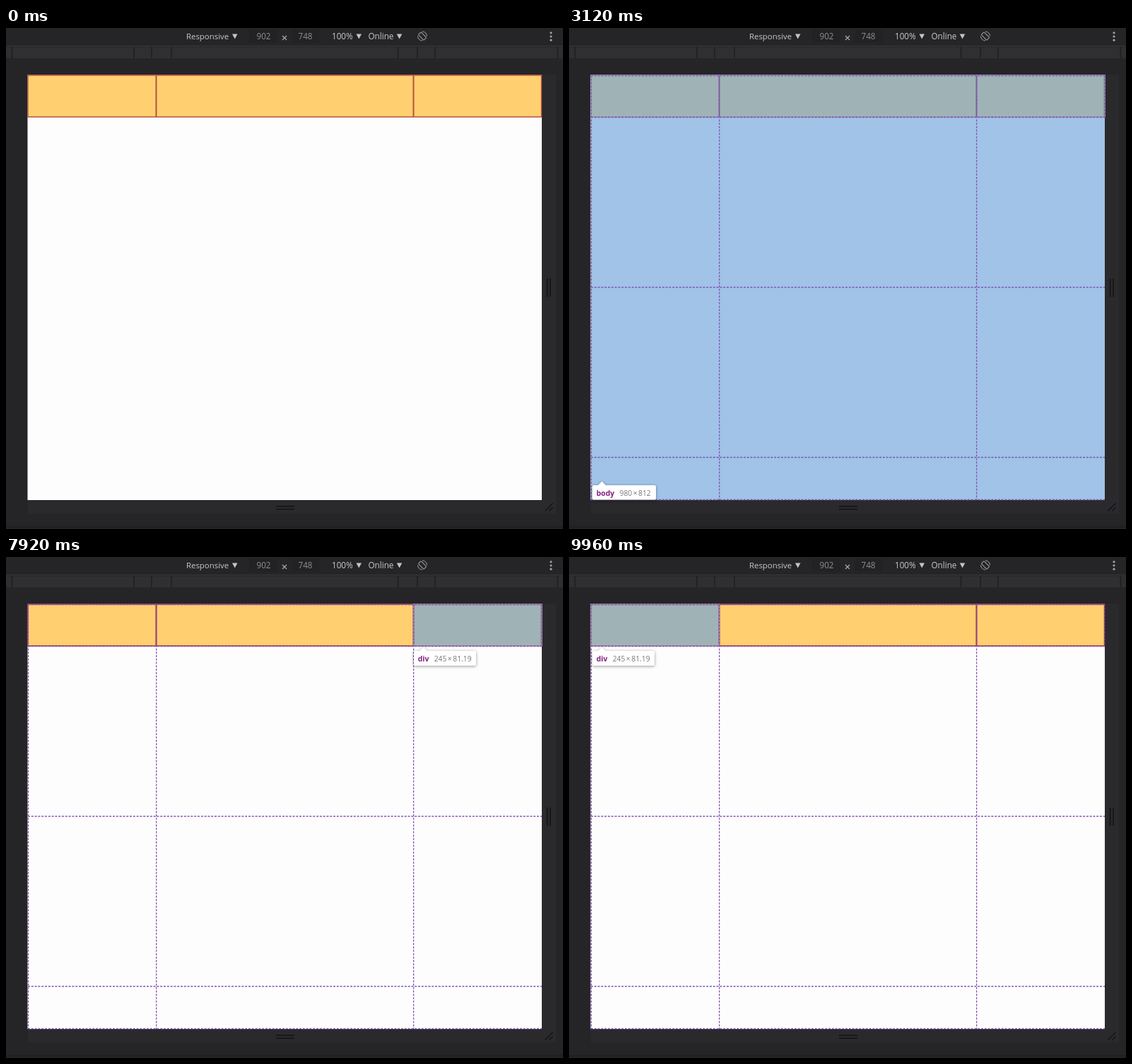
These frames come from a looping animation (788 by 710 pixels, 10000 ms). An HTML page:

```html
<!DOCTYPE html>
<html lang="en">
<head>
<meta charset="utf-8">
<title>Grid inspector</title>
<style>
  html, body { margin: 0; width: 100%; height: 100%; overflow: hidden; background: #252427; }
  svg { display: block; width: 788px; height: 710px; font-family: "Open Sans", "Noto Sans", sans-serif; }
  .bar text { font-size: 11.7px; fill: #c9c9cb; }
  .bar .dim { fill: #8e8e91; }
  .grip { stroke: #131214; stroke-width: 1.5; fill: none; }
  .icon { stroke: #a2a2a5; fill: none; }
  .cell { fill: #ffcf70; }
  .cell.on { fill: #9fb3b6; }
  .edge { fill: none; stroke: #b4533d; }
  .grid { fill: none; stroke: #8153b0; stroke-width: 1.3; stroke-dasharray: 3 1.8; }
  .tip { filter: drop-shadow(0 1px 2px #0006); }
  .tip path { fill: #fff; }
  .name { font-weight: bold; font-size: 10.4px; fill: #84207f; }
  .size { font-size: 10.3px; fill: #77777a; }
</style>
</head>
<body>
<svg viewBox="0 0 788 710">
  <rect width="788" height="710" fill="#252427"/>
  <path d="M0 25.5H788" stroke="#39383b"/>
  <rect y="27" width="788" height="16" fill="#2f2e31"/>
  <path d="M8.5 27v16M181 27v16M206 27v16M234 27v16M554.5 27v16M582 27v16M607 27v16M780.5 27v16" stroke="#222124" stroke-width="2"/>
  <path d="M758 66H778V688H31V669H758Z" fill="#2a292c"/>
  <path d="M0 707H788" stroke="#1e1d20" stroke-width="2"/>

  <g class="bar">
    <rect x="344" y="3" width="40" height="18" fill="#222124"/>
    <rect x="404" y="3" width="39" height="18" fill="#222124"/>
    <text x="255" y="16" style="font-size:11.4px">Responsive</text>
    <text x="354.5" y="16" class="dim">902</text>
    <text x="413.5" y="16" class="dim">748</text>
    <text x="461" y="16">100%</text>
    <text x="512.5" y="16">Online</text>
    <path d="M320 8.5h7.5l-3.75 7zM495.500 8.500h7.500l-3.750 7zM552.800 8.500h7.500l-3.750 7z" fill="#c4c4c6"/>
    <path d="M391 11l6 6M397 11l-6 6" stroke="#a9a9ac" stroke-width="1.2"/>
    <g class="icon" transform="translate(589 11.500)">
      <rect x="-2.700" y="-5.500" width="5.400" height="11" rx="1" transform="rotate(-45)"/>
      <path d="M0 -6.500A6.500 6.500 0 0 1 6.500 0M0 6.500A6.500 6.500 0 0 1 -6.500 0"/>
    </g>
    <g fill="#a2a2a5">
      <circle cx="771" cy="6.800" r="1.600"/>
      <circle cx="771" cy="12" r="1.600"/>
      <circle cx="771" cy="17.200" r="1.600"/>
    </g>
  </g>

  <path class="grip" d="M765.700 355v26M770 355v26M382 677.700h26M382 682h26M762.500 684.500l11-11M768.500 684.500l5-5"/>

  <rect x="30.500" y="66.500" width="727.500" height="602.500" fill="#fefdfe"/>
  <rect id="wash" x="31" y="67" width="727" height="602" fill="#a0c3e7"/>
  <rect class="cell" x="31" y="67" width="181.500" height="59"/>
  <rect class="cell" x="212.500" y="67" width="364" height="59"/>
  <rect class="cell" x="576.500" y="67" width="181.500" height="59"/>
  <g id="edges">
    <path class="edge" d="M31 67H757.500V126H31Z" stroke-width="1.400"/>
    <path class="edge" d="M212.500 67v59M576.500 67v59" stroke-width="2"/>
  </g>
  <g id="overlay">
    <rect id="mute" fill="none" stroke="#9fa6ae" stroke-width="1.400" y="67" height="59"/>
    <path class="grid" d="M31 67.500H758M31 126.500H758M31 367.500H758M31 608.500H758M31 668.500H758"/>
    <path class="grid" d="M31.500 67V669M212.700 67V669M576.600 67V669M757.500 67V126"/>
  </g>
  <g id="tip" class="tip">
    <path id="bubble"/>
    <text id="name" class="name"></text>
    <text id="size" class="size"></text>
  </g>
</svg>
<script>
  const $ = id => document.getElementById(id);
  const cells = [...document.querySelectorAll('.cell')];
  const LOOP = 10000;

  const boxes = {
    div1: { x: 33, y: 133, w: 88, h: 21, on: [0], size: ['245', '81.19'] },
    div2: { x: 213.5, y: 133, w: 88, h: 21, on: [1], size: ['490', '81.19'] },
    div3: { x: 577, y: 133, w: 88, h: 21, on: [2], size: ['245', '81.19'] },
    body: { x: 33, y: 648, w: 90, h: 20.5, on: [0, 1, 2], size: ['980', '812'] }
  };

  // Hovered element from each moment on
  const hover = [
    [0, ''], [400, 'div3'], [800, 'div2'], [1200, 'div1'], [1600, 'body'],
    [3880, 'div1'], [5400, 'div2'], [7040, 'div3'], [8080, 'div2'],
    [8400, 'div1'], [8760, 'div2'], [9080, 'div3'], [9480, 'div2'], [9760, 'div1']
  ];

  const show = (el, on) => el.setAttribute('visibility', on ? 'visible' : 'hidden');
  const put = (el, attrs) => { for (const k in attrs) el.setAttribute(k, attrs[k]); };

  function render(id) {
    const box = boxes[id], all = id === 'body';
    cells.forEach((c, i) => c.classList.toggle('on', !!box && box.on.includes(i)));
    show($('wash'), all);
    show($('overlay'), box);
    show($('tip'), box);
    const color = !box ? '#b4533d' : all ? '#8064a0' : '#a52a4c';
    document.querySelectorAll('.edge').forEach(e => e.style.stroke = color);
    if (!box) return;

    const { x, y, w, h, size } = box;
    const first = cells[box.on[0]];
    put($('mute'), { x: first.getAttribute('x'), width: all ? 727 : first.getAttribute('width') });
    $('bubble').setAttribute('d',
      `M${x + 2} ${y}h6l5.5 -5.500 5.500 5.500h${w - 21}q2 0 2 2v${h - 4}q0 2 -2 2h${4 - w}q-2 0 -2 -2v${4 - h}q0 -2 2 -2z`);
    $('name').textContent = all ? 'body' : 'div';
    put($('name'), { x: x + 5.7, y: y + 14.5 });
    $('size').innerHTML = `${size[0]}<tspan dx="1.500">×</tspan><tspan dx="1.500">${size[1]}</tspan>`;
    put($('size'), { x: x + (all ? 38.5 : 28.7), y: y + 14.5 });
  }

  let current = null;
  function tick() {
    const t = performance.now() % LOOP;
    const id = hover.filter(([at]) => at <= t).pop()[1];
    if (id !== current) render(current = id);
    requestAnimationFrame(tick);
  }
  tick();
</script>
</body>
</html>
```
